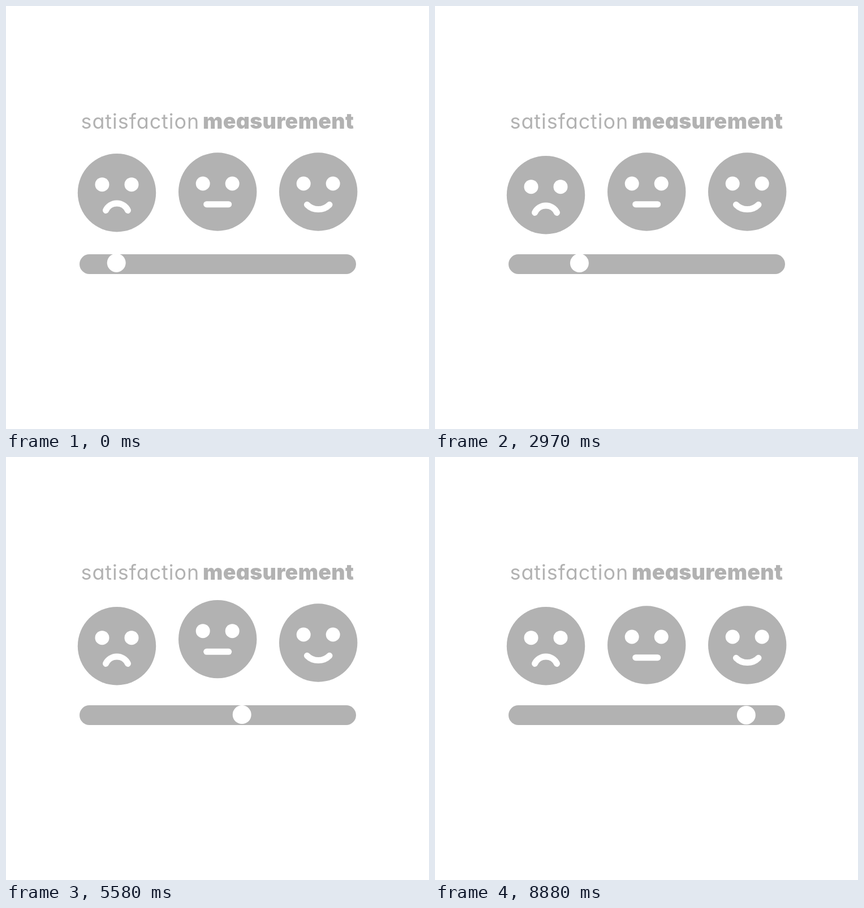
An HTML page for the animation above (9000 ms loop, 748 by 748 pixels).

```html
<!DOCTYPE html>
<html lang="en">
<head>
<meta charset="utf-8">
<title>satisfaction measurement</title>
<style>
  html, body { margin: 0; width: 100%; height: 100%; overflow: hidden; background: #fff; }
  svg { display: block; width: 100%; height: 100%; }
  text { font: 380 36px Inter, sans-serif; font-feature-settings: "cv11"; letter-spacing: 0.9px; }
  .bold { font-size: 37.5px; font-weight: 900; letter-spacing: 0.3px; }
  .mouth { fill: none; stroke: #fff; stroke-width: 11; stroke-linecap: round; }
</style>
</head>
<body>
<svg viewBox="0 0 748 748" fill="#b2b2b2">
  <defs>
    <g id="head">
      <circle r="69.2"/>
      <circle cx="-26" cy="-14.5" r="12.5" fill="#fff"/>
      <circle cx="26" cy="-14.5" r="12.5" fill="#fff"/>
    </g>
  </defs>
  <text x="132.5" y="217">satisfaction</text>
  <text x="348" y="217" class="bold">measurement</text>
  <g class="face"><use href="#head"/><path class="mouth" d="M-19.5 31.2A21.5 21.5 0 0 1 19.5 31.2"/></g>
  <g class="face"><use href="#head"/><path class="mouth" d="M-19.5 22.2H19.5"/></g>
  <g class="face"><use href="#head"/><path class="mouth" d="M-19.8 22.8A27.8 27.8 0 0 0 19.8 22.8"/></g>
  <rect x="130" y="439" width="489" height="35" rx="17.5"/>
  <circle id="knob" r="16.5" fill="#fff"/>
</svg>
<script>
  const LOOP = 9000, RISE = 670, FALL = 900, LIFT = 13.3;
  const faces = [
    { x: 196, rest: 330.2, end: 334.2, start: 75 },
    { x: 374.2, rest: 328.5, end: 332.5, start: 4520 },
    { x: 552.2, rest: 328.5, end: 332.5, start: 6875 },
  ];
  const nodes = document.querySelectorAll('.face');
  const knob = document.getElementById('knob');

  const mix = (a, b, k) => a + (b - a) * k;
  const ease = (t, start, length) => {
    const u = Math.min(1, Math.max(0, (t - start) / length));
    return u * u * (3 - 2 * u);
  };

  // Each face hops up, then settles slightly below its resting place.
  function faceY(f, t) {
    const up = mix(f.rest, f.rest - LIFT, ease(t, f.start, RISE));
    return mix(up, f.end, ease(t, f.start + RISE, FALL));
  }

  function draw(t) {
    faces.forEach((f, i) => nodes[i].setAttribute('transform', `translate(${f.x} ${faceY(f, t)})`));
    const k = ease(t, 855, 8090);
    knob.setAttribute('cx', mix(195.2, 550.4, k));
    knob.setAttribute('cy', mix(454.2, 456.4, k));
  }

  const begin = performance.now();
  function tick() {
    draw((performance.now() - begin) % LOOP);
    requestAnimationFrame(tick);
  }
  draw(0);
  requestAnimationFrame(tick);
</script>
</body>
</html>
```
